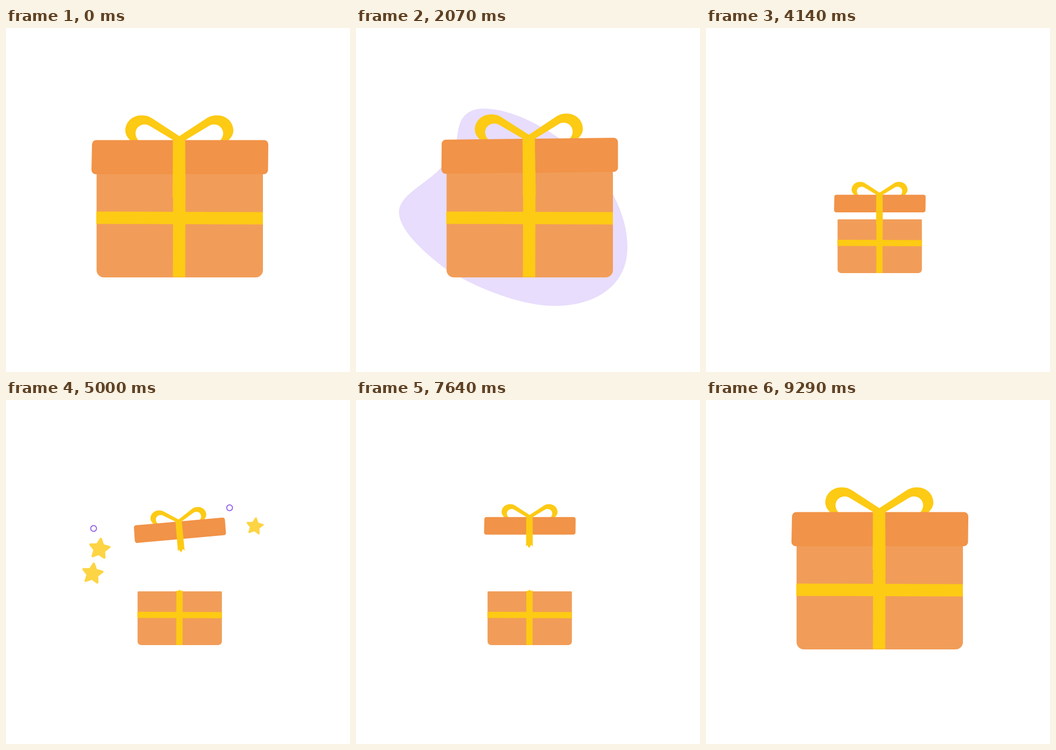
An HTML page for the animation above (9570 ms loop, 640 px wide and 640 px high).

```html
<!DOCTYPE html>
<html lang="en">
<head>
<meta charset="utf-8">
<title>Gift box</title>
<style>
  html, body { margin: 0; width: 100%; height: 100%; overflow: hidden; background: #fff; }
  svg { display: block; width: 100%; height: 100%; }
  .ribbon { fill: #fdca14; }
  .star { fill: #fdca14; stroke: #fdca14; stroke-width: .2; stroke-linejoin: round; }
  .ring { fill: none; stroke: #8f5ce6; stroke-width: .34; }
</style>
</head>
<body>
<svg viewBox="0 0 640 640">
  <path id="blob" fill="#e8ddfc" d="M80 343C80 310 132 290 159 259C196 222 184 196 195 174C203 155 222 150 237 150
    C290 150 350 185 379 206C420 235 460 275 479 311C496 345 505 375 505 408C505 480 445 517 370 517
    C308 517 228 486 168 449C125 417 80 375 80 343Z"/>
  <g id="particles"></g>
  <g id="body">
    <path fill="#f19d59" d="M168.500 270a3 3 0 0 1 3-3H475a3 3 0 0 1 3 3V450.500a13.500 13.500 0 0 1-13.500 13.500H182a13.500 13.500 0 0 1-13.500-13.500Z"/>
    <path class="ribbon" d="M168 341.500L478 342.500V365.500L168 364.500Z"/>
    <path class="ribbon" d="M311 264L316 266L323 261L329 266L334 263L333.500 463.500H310.500Z"/>
  </g>
  <g id="lid">
    <path id="loop" class="ribbon" d="M232 210C226 204 222 198 222 191C222 175 235 162.500 252 162.500
      C260 162.500 265 164 271 167.500L323 201.500V212H317L268 182.500C264 180 261 179.500 258 179.500
      C248 179.500 241 187 241 196C241 201 243 205 247 210Z"/>
    <use href="#loop" transform="matrix(-1 0 0 1 645 0)"/>
    <path fill="#f19348" d="M160 216.500a8 8 0 0 1 8-8H480a8 8 0 0 1 8 8L487.500 264a8 8 0 0 1-8 8H167a8 8 0 0 1-8-8Z"/>
    <path class="ribbon" d="M310.500 209L322.500 201L333.500 209L334 315L328.600 308L320.500 320L314 309L310 316Z"/>
  </g>
</svg>
<script>
const LOOP = 9570, FPS = 14;
const BURST = { x: 323, y: 385 };
const byId = id => document.getElementById(id);

// Progress 0..1 between two times, plain and eased at both ends.
const linear = (t, from, to) => Math.min(1, Math.max(0, (t - from) / (to - from)));
const ease = (t, from, to) => {
  const u = linear(t, from, to);
  return u * u * (3 - 2 * u);
};

// Each particle flies from the box to `to`; `via` bends its path halfway.
const firstWave = { launch: 4100, flight: 1800 };
const secondWave = { launch: 5050, flight: 1100 };
const particles = [
  { shape: 'star', ...firstWave, via: [174, 277], to: [55.5, 182.5], size: 26 },
  { shape: 'star', ...firstWave, via: [161, 323], to: [41, 308.5], size: 26 },
  { shape: 'star', ...firstWave, via: [463, 235], to: [474, 300], size: 21 },
  { shape: 'ring', ...firstWave, via: [163, 239], to: [122, 194], size: 5.4 },
  { shape: 'ring', ...firstWave, via: [416, 200.5], to: [424, 199.5], size: 5.4, gone: 6340 },
  { shape: 'star', ...secondWave, to: [212.5, 246], size: 17 },
  { shape: 'ring', ...secondWave, to: [115, 291.5], size: 8 },
  { shape: 'ring', ...secondWave, to: [545, 247.5], size: 12.2 }
];

const starPoints = Array.from({ length: 10 }, (_, i) => {
  const r = i % 2 ? 0.45 : 0.9, a = i * Math.PI / 5;
  return `${(r * Math.sin(a)).toFixed(3)},${(-r * Math.cos(a)).toFixed(3)}`;
}).join(' ');

for (const p of particles) {
  const isStar = p.shape === 'star';
  p.el = document.createElementNS('http://www.w3.org/2000/svg', isStar ? 'polygon' : 'circle');
  p.el.setAttribute('class', p.shape);
  p.el.setAttribute(isStar ? 'points' : 'r', isStar ? starPoints : 1);
  byId('particles').append(p.el);
}

// Quadratic arc that passes through `via` at its middle.
function arc(start, via, end, u) {
  const control = 2 * via - (start + end) / 2, w = 1 - u;
  return start * w * w + 2 * control * u * w + end * u * u;
}

function drawParticle({ el, shape, launch, flight, via, to, size, gone = 6980 }, t) {
  const u = ease(t, launch, launch + flight);
  const [midX, midY] = via || [(BURST.x + to[0]) / 2, (BURST.y + to[1]) / 2];
  const x = arc(BURST.x, midX, to[0], u), y = arc(BURST.y, midY, to[1], u);
  const isStar = shape === 'star';
  const scale = isStar ? size * (0.6 + 0.4 * u) : size;
  const ageFade = isStar ? 1 - linear(t, launch, launch + 4400) : 1;
  el.setAttribute('transform', `translate(${x} ${y}) rotate(${15 * u}) scale(${scale})`);
  el.setAttribute('opacity', t < launch ? 0 : ageFade * (1 - ease(t, gone - 700, gone)));
}

function draw(t) {
  byId('blob').setAttribute('opacity', ease(t, 0, 1500) - ease(t, 2070, 2900));

  const grow = ease(t, 8820, 9285);
  const bodyShrink = ease(t, 2833, 3253) - grow;
  byId('body').setAttribute('transform',
    `translate(323.2 ${464 - 8 * bodyShrink}) scale(${1 - 0.493 * bodyShrink}) translate(-323.2 -464)`);

  const lidShrink = ease(t, 2785, 3205) - grow;
  const peek = 4.9 * (ease(t, 0, 1450) - ease(t, 1450, 2250));
  const lift = ease(t, 3600, 6150) - linear(t, 6330, 8000) ** 4;
  const tilt = 21 * (ease(t, 4460, 6150) - ease(t, 6250, 7640));
  byId('lid').setAttribute('transform',
    `translate(323.4 ${240 + 108 * lidShrink - 184.5 * lift}) rotate(${-tilt}) scale(${1 - 0.482 * lidShrink}) ` +
    `translate(-323.4 -240) rotate(${-peek} 90 271)`);

  for (const p of particles) drawParticle(p, t);
}

const start = performance.now();
function tick() {
  const elapsed = (performance.now() - start) % LOOP;
  draw(Math.floor((elapsed + 5) * FPS / 1000) * 1000 / FPS);
  requestAnimationFrame(tick);
}
tick();
</script>
</body>
</html>
```
